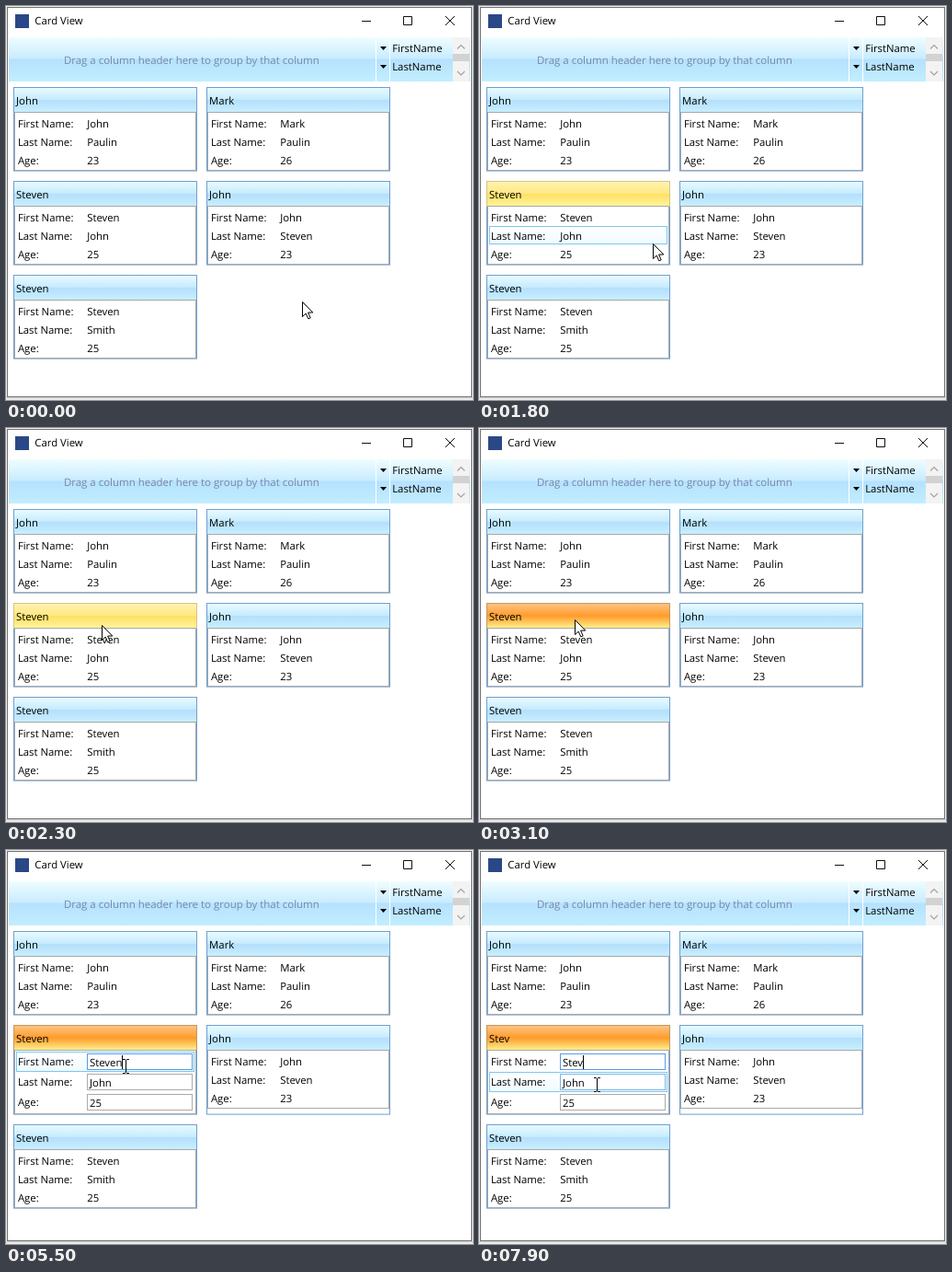
Recreate the animation shown at these times as an HTML page. Size 508 px wide and 428 px high, loop 8 s.

```html
<!DOCTYPE html>
<html lang="en">
<head>
<meta charset="utf-8">
<title>Card View</title>
<style>
  html, body { margin: 0; width: 100%; height: 100%; overflow: hidden; background: #fff; }
  svg { display: block; width: 508px; height: 428px; }
  text { font: 11.35px "Open Sans", "Noto Sans", sans-serif; text-rendering: geometricPrecision; white-space: pre; }
  .hint text { font-size: 11.48px; }
</style>
</head>
<body>
<svg viewBox="0 0 508 428" xmlns="http://www.w3.org/2000/svg">
  <defs id="defs"></defs>
  <g id="frame"></g>
  <g id="scene"></g>
</svg>
<script>
const LOOP = 8000;
const byId = id => document.getElementById(id);

// Vertical gradient: [offset, colour] pairs
const gradient = (id, ...stops) =>
  `<linearGradient id="${id}" x2="0" y2="1">` +
  stops.map(([at, color]) => `<stop offset="${at}" stop-color="${color}"/>`).join('') +
  '</linearGradient>';

const fillRect = (x, y, w, h, fill) =>
  `<rect x="${x}" y="${y}" width="${w}" height="${h}" fill="${fill}"/>`;

// One-pixel outline whose outer size is w by h
const box = (x, y, w, h, stroke, fill = 'none') =>
  `<rect x="${x + .5}" y="${y + .5}" width="${w - 1}" height="${h - 1}" fill="${fill}" stroke="${stroke}"/>`;

const text = (x, y, str, fill = '#000') => `<text x="${x}" y="${y}" fill="${fill}">${str}</text>`;

const line = (d, stroke, width = 1) =>
  `<path d="${d}" fill="none" stroke="${stroke}" stroke-width="${width}"/>`;

byId('defs').innerHTML =
  gradient('blue', [0, '#eafcff'], [.48, '#c6ebff'], [.5, '#b3dffc'], [1, '#c9efff']) +
  gradient('yellow', [0, '#fff3b0'], [.48, '#ffe984'], [.5, '#ffe064'], [1, '#fff49c']) +
  gradient('orange', [0, '#ffc584'], [.46, '#ff9f35'], [.5, '#ff9b28'], [1, '#fff290']) +
  gradient('panel', [0, '#effdff'], [.48, '#c8ecff'], [.5, '#b5e1fe'], [1, '#c2eeff']) +
  gradient('row', [0, '#ffffff'], [1, '#f0faff']) +
  gradient('shadow', [0, '#cfcfcf'], [1, '#f4f4f4']);

function windowFrame() {
  const triangle = y => `<path d="M407 ${y}h7l-3.5 4z"/>`;
  return fillRect(0, 0, 508, 428, '#f1f1f1') +
    fillRect(0, 425, 508, 3, 'url(#shadow)') +
    box(1, 1, 506, 424, '#707070', '#fff') +
    fillRect(10, 9, 15, 15, '#2a4887') +
    text(31.3, 20, 'Card View') +
    line('M387 16.5h10M432.5 11.5h9v9h-9zM478 11l10 10M488 11l-10 10', '#111') +
    fillRect(3, 34, 502, 48, 'url(#panel)') +
    `<g class="hint">${text(62.9, 63, 'Drag a column header here to group by that column', '#7787aa')}</g>` +
    line('M402.5 34v48M417.5 34v48', '#fff') +
    triangle(44) + triangle(64) +
    text(420.2, 50, 'FirstName') + text(420.2, 70, 'LastName') +
    fillRect(486, 34, 18, 48, '#f3f3f3') +
    fillRect(486, 52, 18, 8, '#d2d2d2') +
    line('M491 46.5l4 -4l4 4M491 71l4 4l4 -4', '#a3a3a3', 1.2);
}

const LABELS = ['First Name:', 'Last Name:', 'Age:'];
const CARDS = [
  [8, 88, 'John', 'Paulin', 23],
  [218, 88, 'Mark', 'Paulin', 26],
  [8, 190, 'Steven', 'John', 25],
  [218, 190, 'John', 'Steven', 23],
  [8, 292, 'Steven', 'Smith', 25]
];
const EDITED = 2;
const BORDER = { blue: '#6f9fd0', yellow: '#d3c48c', orange: '#bd9a66' };

// Hard pointer steps: time, x, y
const POINTER = [
  [0, 322, 321], [1500, 283, 307], [1600, 251, 292], [1700, 220, 276], [1800, 189, 258],
  [1900, 161, 241], [2000, 138, 229], [2100, 120, 220], [2200, 109, 216], [2300, 104, 214],
  [3100, 104, 208], [5000, 109, 213], [5100, 118, 222], [5200, 126, 231], [5300, 130, 235],
  [7400, 129, 236], [7700, 129, 240], [7800, 128, 247], [7900, 128, 255]
];
// Caret column by time, 0 when blinked off
const CARET = [[0, 0], [5500, 127], [6100, 0], [6400, 120], [6800, 114], [7300, 0], [7900, 114]];
const NAME = [[0, 'Steven'], [6400, 'Steve'], [6800, 'Stev']];

const stepAt = (steps, t) => steps.filter(s => s[0] <= t).pop().slice(1);

function stateAt(t) {
  const [px, py] = stepAt(POINTER, t);
  return {
    px, py,
    caret: stepAt(CARET, t)[0],
    name: stepAt(NAME, t)[0],
    selected: t >= 3100,
    editing: t >= 4500,
    focused: t >= 5500
  };
}

function card(index, s) {
  let [x, y, ...values] = CARDS[index];
  const edit = s.editing && index === EDITED;
  const selected = s.selected && index === EDITED;
  if (s.editing && index === 4) y += 6;
  if (index === EDITED) values[0] = s.name;

  const height = s.editing && (index === 2 || index === 3) ? 97.6 : 91.6;
  const bodyHeight = edit ? 70 : 64;
  const pitch = edit ? 22 : 20;
  const inside = s.px >= x && s.px < x + 200 && s.py >= y && s.py < y + height;
  const hoverRow = inside ? Math.floor((s.py - y - 29) / pitch) : -1;
  const tone = selected ? 'orange' : inside ? 'yellow' : 'blue';

  let out = box(x, y, 200, height, BORDER.blue, '#fff') +
    box(x, y, 200, 28, BORDER[tone], `url(#${tone})`) +
    box(x + 1, y + 27, 198, bodyHeight, '#a8a8a8', '#fff') +
    text(x + 3.1, y + 19, values[0]);

  LABELS.forEach((label, i) => {
    const top = y + 29 + i * pitch;
    const base = top + 15;
    const hover = i === hoverRow;
    if (hover) out += box(x + 3, top, 194, edit ? 22 : 20, '#7cc8ee', 'url(#row)');
    out += text(x + 4.9, base, label);
    if (edit) {
      const border = s.focused && i === 0 ? '#569de5' : hover ? '#7eb4ea' : '#ababab';
      out += box(x + 80, top + 2, 115, 18, border, '#fff') + text(x + 83, base + 1, values[i]);
    } else {
      out += text(x + 80.2, base, values[i]);
    }
  });
  return out;
}

function pointer({ px, py, editing }) {
  const overField = editing && px >= 88 && px < 203 && py >= 221;
  const shape = overField
    ? line('M-3 -7.5h2.5l1 1l1 -1H4M.5 -7V7M-3 7.5h2.5l1 -1l1 1H4', '#000')
    : '<path d="M.5 .5V16.5L4.2 13L6.8 18.8L9.2 17.8L6.6 12H11.8Z" fill="#fff" stroke="#000"/>';
  return `<g transform="translate(${px} ${py})">${shape}</g>`;
}

function scene(s) {
  return CARDS.map((_, i) => card(i, s)).join('') +
    (s.caret ? fillRect(s.caret - 1, 223, 1, 15, '#000') : '') +
    pointer(s);
}

let shown = '';
function tick(now) {
  const state = stateAt(now % LOOP);
  const key = JSON.stringify(state);
  if (key !== shown) {
    byId('scene').innerHTML = scene(state);
    shown = key;
  }
  requestAnimationFrame(tick);
}

byId('frame').innerHTML = windowFrame();
tick(0);
</script>
</body>
</html>
```
